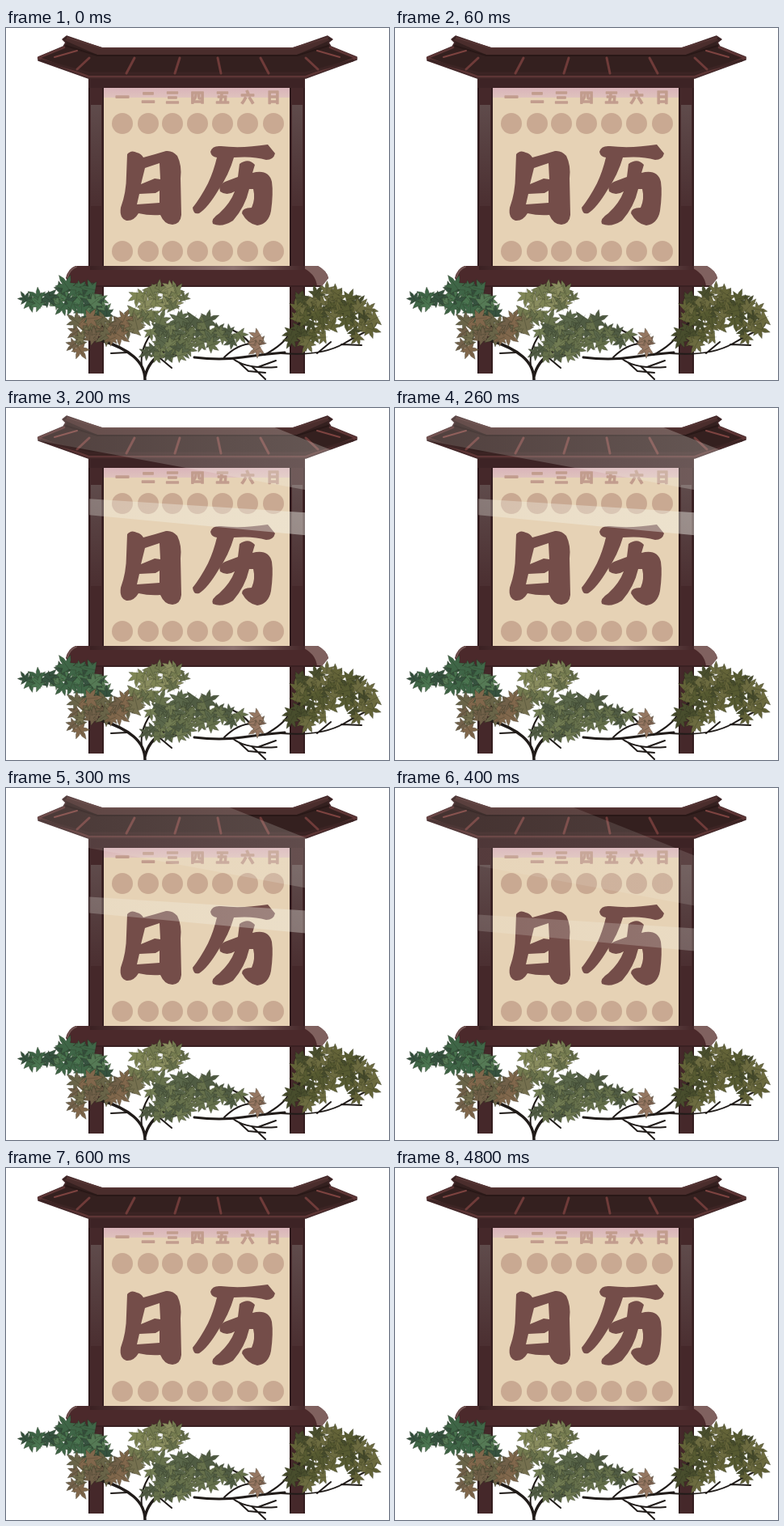
An HTML page with a canvas that plays this animation: 474 by 435 pixels, repeating every 7.6 s.

```html
<!DOCTYPE html>
<html lang="zh">
<head>
<meta charset="utf-8">
<style>
html, body { margin: 0; width: 100%; height: 100%; overflow: hidden; background: #fff; }
canvas { display: block; }
</style>
</head>
<body>
<canvas id="stage" width="474" height="435" role="img" aria-label="日历"></canvas>
<script>
const stage = document.getElementById('stage');
const view = stage.getContext('2d');
const scene = document.createElement('canvas');
scene.width = 474;
scene.height = 435;
const ctx = scene.getContext('2d');

let seed = 11;
const random = () => (seed = seed * 16807 % 2147483647) / 2147483647;

function fill(path, color, rule = 'nonzero') {
  ctx.fillStyle = color;
  ctx.fill(new Path2D(path), rule);
}

function line(path, color, width) {
  ctx.strokeStyle = color;
  ctx.lineWidth = width;
  ctx.stroke(new Path2D(path));
}

function rect(x, y, w, h, color) {
  ctx.fillStyle = color;
  ctx.fillRect(x, y, w, h);
}

function gradient(x0, y0, x1, y1, ...colors) {
  const g = ctx.createLinearGradient(x0, y0, x1, y1);
  colors.forEach((c, i) => g.addColorStop(i / (colors.length - 1), c));
  return g;
}

function drawPost(x) {
  rect(x, 60, 19, 367, '#45282a');
  rect(x, 60, 2, 367, '#2f1a1c');
  rect(x + 17, 60, 2, 367, '#341d1f');
  rect(x + 3, 95, 13, 125, gradient(0, 95, 0, 220, '#5f4b4b', '#4b2f31'));
}

function drawRoof() {
  const outline = 'M75 10L119 25H355L398 10L404 14L399 18L402 23L434 36V39L371 62H102L40 40V36L71 23L74 18L70 14Z';
  fill(outline, '#34201f');
  line(outline, '#43282a', 1.5);
  fill('M76 12L119 25H355L397 12L401 15L358 34H115L72 15Z', '#4a2d2c');
  line('M76 12L119 25H355L398 12', '#553534', 2);
  line('M74 22L113 34H360L399 22', '#291817', 2);
  line('M72 24L40 37L102 60H371L433 37L401 24', '#5d3535', 2.5);
  line('M44 40L103 56H370L429 40', '#3c2424', 3);
  line('M103 37L88 51M159 37L149 56M215 37L209 56M262 37L266 56M315 37L325 56M371 37L386 51', '#6f3b39', 3);
  line('M60 36L88 28M413 36L385 28', '#7d4340', 2);
}

function drawBoard() {
  drawPost(102);
  drawPost(351);
  rect(102, 61, 268, 13, '#3d2325');
  rect(121, 74, 230, 220, '#e6d2b5');
  rect(121, 74, 230, 12, gradient(0, 74, 0, 86, '#d9b4ba', '#dfc2bd'));

  ctx.font = '900 17px "Noto Sans CJK SC", "Noto Sans CJK", sans-serif';
  ctx.textAlign = 'center';
  ctx.textBaseline = 'middle';
  ctx.strokeStyle = '#c29d8e';
  ctx.lineWidth = 1.4;
  [144, 176, 206, 237, 268, 299, 331].forEach((x, i) => {
    ctx.fillStyle = '#c9a992';
    for (const y of [118, 276]) {
      ctx.beginPath();
      ctx.arc(x, y, 13, 0, 7);
      ctx.fill();
    }
    ctx.fillStyle = '#c29d8e';
    ctx.fillText('一二三四五六日'[i], x, 86);
    ctx.strokeText('一二三四五六日'[i], x, 86);
  });

  fill('M86 294H386Q397 300 399 309L390 320H81L74 309Q77 297 86 294Z', '#4b292b');
  fill('M362 294H386Q397 300 399 309L390 320H385Q384 302 362 294Z', '#80615f');
  line('M76 308Q79 298 87 295', '#735452', 2);
  rect(104, 294, 266, 5, gradient(104, 0, 370, 0, '#3a2022', '#694a4a', '#8f7472', '#442628'));
  line('M82 319H389', '#3a2022', 2);
}

function drawTitle() {
  const ink = '#744d49';
  // 日
  fill('M150 156Q155 150 162 154Q167 155 170 160Q185 156 198 152Q206 151 212 158Q218 170 216 186L217 231Q216 242 206 243Q196 243 191 231Q177 232 164 229Q158 239 149 238Q140 235 142 222Q149 203 149 182Z' +
    'M172 173L190 167L191 187L184 186L167 193ZM165 205L185 204L190 201V216L162 218Z', ink, 'evenodd');
  // 历
  fill('M253 153Q255 145 266 146Q292 149 324 144L333 155Q331 163 322 163Q306 158 282 160Q276 181 263 200Q250 222 239 229Q232 231 231 222Q240 211 250 192Q257 177 261 160Q254 159 253 153Z', ink);
  fill('M289 168Q300 160 308 169L305 179Q325 174 329 190Q331 204 328 226Q325 242 311 244Q299 242 292 229Q292 222 304 222Q309 211 306 199L301 199Q296 221 281 238Q267 247 256 242Q253 236 264 229Q278 216 283 202Q273 208 265 202Q262 194 271 190L287 184Z', ink);
}

function drawBranches() {
  const bark = '#201b19';
  line('M172 435Q172 418 158 406T118 386M172 431Q176 412 195 400T238 384', bark, 3.5);
  line('M168 418Q165 395 184 372L200 340M150 401L130 402M187 405L205 420M197 400L214 405', bark, 2);
  line('M233 407Q265 411 292 407T345 401', bark, 3);
  line('M340 402Q390 406 418 390T455 371M270 407Q288 389 308 390M278 372Q298 381 310 400M320 404Q345 390 350 378T385 355M415 391L440 392M385 402L402 388', bark, 2);
  line('M280 408Q297 422 335 419M304 418L321 434M288 413L300 424L321 426M312 419L334 411', bark, 2);
}

function drawLeaf(x, y, size, angle, color) {
  ctx.save();
  ctx.translate(x, y);
  ctx.rotate(angle);
  ctx.beginPath();
  const point = (r, a) => ctx.lineTo(r * Math.sin(a), -r * Math.cos(a));
  for (let i = -2; i <= 2; i++) {
    const a = i * .95, r = size * (1 - Math.abs(i) * .13);
    point(r * .62, a - .27);
    point(r, a);
    point(r * .62, a + .27);
    if (i < 2) point(size * .36, a + .475);
  }
  ctx.fillStyle = color;
  ctx.fill();
  ctx.strokeStyle = 'rgba(35,40,25,.3)';
  ctx.lineWidth = .8;
  ctx.moveTo(0, -size * .6);
  ctx.lineTo(0, size * .4);
  ctx.stroke();
  ctx.restore();
}

// Scatter leaves over an ellipse.
function drawCluster(x, y, rx, ry, count, size, ...colors) {
  for (let i = 0; i < count; i++) {
    const a = i * 2.4 + random() * .5, r = Math.sqrt((i + .5) / count);
    drawLeaf(x + rx * r * Math.cos(a), y + ry * r * Math.sin(a),
      size * (.8 + random() * .4), random() * 6.3, colors[Math.floor(random() * colors.length)]);
  }
}

function drawFoliage() {
  const green = ['#3f6647', '#4a7550', '#36523f', '#557a55'];
  const brown = ['#716049', '#80674c', '#696448', '#75704f'];
  const light = ['#7f8555', '#747b50', '#8a8d5f', '#666f4b'];
  const moss = ['#66714c', '#5a674a', '#717c53', '#505c43'];
  const olive = ['#565a31', '#636338', '#484d2d', '#6c6b40'];
  drawCluster(193, 333, 32, 14, 18, 13, ...light);
  drawCluster(168, 354, 16, 8, 7, 13, ...light);
  drawCluster(84, 332, 34, 14, 22, 14, ...green);
  drawCluster(37, 337, 16, 6, 6, 13, ...green);
  drawCluster(110, 350, 17, 12, 10, 13, ...green);
  drawCluster(122, 370, 42, 15, 28, 14, ...brown);
  drawCluster(89, 389, 9, 9, 4, 13, ...brown);
  drawCluster(222, 378, 46, 22, 34, 14, ...moss);
  drawCluster(197, 398, 24, 12, 10, 13, ...moss);
  drawCluster(275, 381, 15, 9, 6, 12, ...moss);
  drawCluster(396, 342, 43, 17, 30, 14, ...olive);
  drawCluster(376, 373, 30, 20, 16, 14, ...olive);
  drawCluster(437, 362, 20, 22, 14, 13, ...olive);
  drawCluster(311, 388, 6, 9, 4, 12, '#8c6f5f', '#967762', '#79604f');
}

// Two slanted bands of light slide down the sign and fade.
function drawSheen(step) {
  const shift = 22.2 * (step - 1), fade = 1 - (step - 1) * .18;
  const beam = (alpha, points) => {
    const g = view.createLinearGradient(39, 0, 371, 0);
    g.addColorStop(0, `rgba(245,247,238,${alpha * .6})`);
    g.addColorStop(1, `rgba(245,247,238,${alpha})`);
    view.fillStyle = g;
    view.beginPath();
    points.forEach(([x, y]) => view.lineTo(x, y + shift));
    view.fill();
  };
  view.globalCompositeOperation = 'source-atop';
  beam(.3 * fade, [[39, -115], [426, 39], [398, 82], [371, 79], [39, 18]]);
  beam(.52 * fade, [[103, 90], [371, 107], [371, 135], [103, 110]]);
  view.globalCompositeOperation = 'source-over';
}

ctx.lineCap = ctx.lineJoin = 'round';
drawBoard();
drawRoof();
drawTitle();
drawBranches();
drawFoliage();

function render(now) {
  const step = Math.floor(now % 7600 / 100);
  view.clearRect(0, 0, 474, 435);
  view.drawImage(scene, 0, 0);
  if (step >= 1 && step <= 5) drawSheen(step);
  requestAnimationFrame(render);
}
render(0);
</script>
</body>
</html>
```
